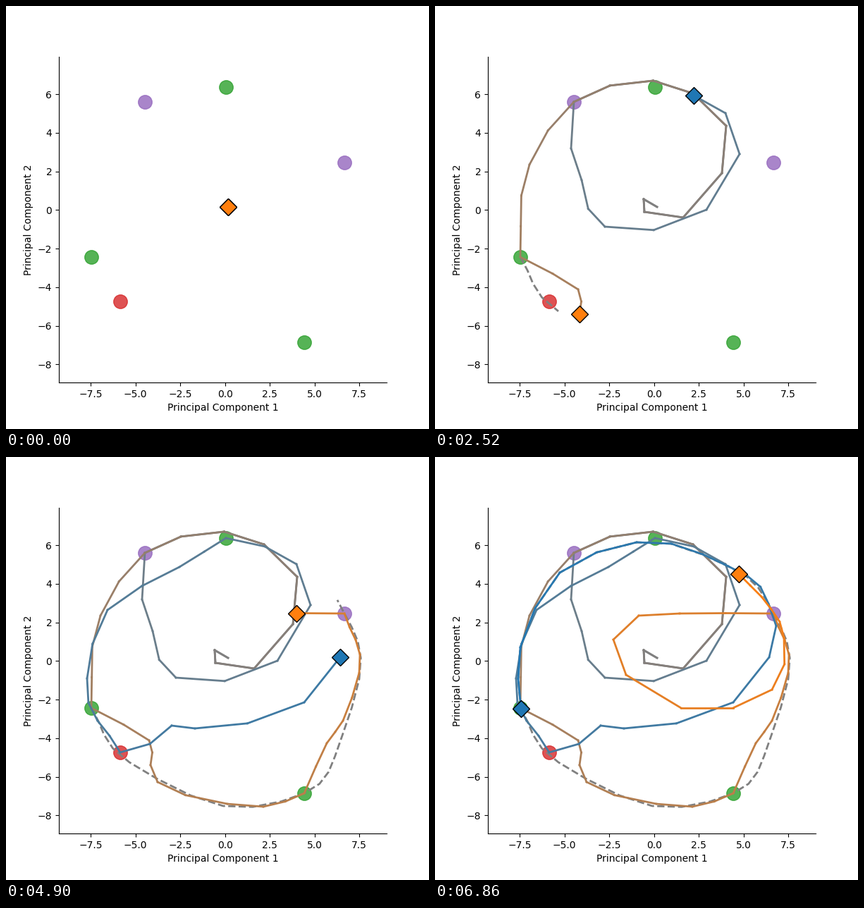
Animation of 600x600 px, one loop 8420 ms. Source, as a matplotlib script:

```python
import matplotlib.pyplot as plt
import numpy as np
from matplotlib.animation import FuncAnimation
from matplotlib.collections import LineCollection
from matplotlib.colors import to_rgb

TICK = 20            # ms per animation frame
STEP = 140           # ms per move along the paths
LOOP = 8420          # ms, includes the hold at the end
LAST = 49            # final step
SPLIT = 14           # step at which the undisturbed path branches off

# Target spots in stage pixels; each one kicks a path off its course.
TOP, LEFT, BOTTOM = (312, 115), (121, 356), (423, 477)
UPPER_LEFT, UPPER_RIGHT = (197, 136), (480, 222)
LOWER_LEFT = (162, 419)
SPOTS = {"tab:green": [TOP, LEFT, BOTTOM],
         "tab:purple": [UPPER_LEFT, UPPER_RIGHT],
         "tab:red": [LOWER_LEFT]}


def glide(keys):
    """Smooth curve through {step: point}, sampled at every whole step."""
    at = np.array(list(keys))
    points = np.array(list(keys.values()), float)
    slopes = np.gradient(points, at, axis=0)
    t = np.arange(at[0], at[-1] + 1)
    i = np.clip(np.searchsorted(at, t, "right") - 1, 0, len(at) - 2)
    span = (at[i + 1] - at[i])[:, None]
    u = (t - at[i])[:, None] / span
    ease = u * u * (3 - 2 * u)
    return (points[i] * (1 - ease) + points[i + 1] * ease
            + span * u * (1 - u) * ((1 - u) * slopes[i] - u * slopes[i + 1]))


def join(*legs):
    """Chain legs whose end and start points coincide."""
    return np.concatenate([legs[0]] + [leg[1:] for leg in legs[1:]])


def home(start):
    """Keys of the common way over the top to the left spot."""
    return {start: (416, 155), start + 3: (286, 121), start + 5: (177, 164),
            start + 7: (121, 270), start + 9: (122, 357)}


intro = glide({0: (315, 285), 1: (296, 274), 2: (297, 292), 3: (352, 300),
               4: (407, 237), 5: (413, 170), 6: (366, 124), 9: UPPER_LEFT,
               11: (134, 225), 14: LEFT})

orange_path = join(
    intro,
    glide({14: LEFT, 16: (203, 402), 18: (205, 437), 19: (215, 461),
           22: (365, 496), 24: BOTTOM}),
    glide({24: BOTTOM, 26: (455, 406), 28: (478, 374), 30: (501, 306),
           34: UPPER_RIGHT}),
    glide({34: UPPER_RIGHT, 36: (347, 222), 37: (289, 225), 38: (253, 259),
           39: (271, 309), 40: (349, 356), 42: (478, 330), 44: (495, 256),
           46: (477, 216), 49: (431, 166)}))

blue_path = join(
    intro[:10],
    glide({9: UPPER_LEFT, 10: (193, 202), 11: (208, 247), 13: (241, 313),
           15: (385, 289), 16: (432, 210), 17: (412, 152), 19: TOP}),
    glide({19: TOP, 21: (246, 156), 23: (144, 217), 25: (115, 314),
           29: LOWER_LEFT}),
    glide({29: LOWER_LEFT, 30: (204, 407), 31: (235, 381), 32: (268, 385),
           34: (423, 348), 35: (474, 284), 37: (473, 208), **home(40)}))

ghost_path = glide({SPLIT: LEFT, 18: (175, 433), 21: (308, 495), 24: BOTTOM,
                    28: (477, 395), 30: (501, 315), 34: UPPER_RIGHT,
                    **home(38)})


def fade(color, share):
    """Blend from mid grey towards a colour."""
    return 0.5 + (np.array(to_rgb(color)) - 0.5) * share


runners = {"tab:blue": blue_path, "tab:orange": orange_path}
segments, colors = [], []
for k in range(LAST):
    for color, path in runners.items():
        segments.append(path[k:k + 2])
        colors.append(fade(color, k / LAST))

fig, ax = plt.subplots(figsize=(6, 6), dpi=100)
ax.set(xlim=(-9.282, 9.032), ylim=(-8.937, 7.943),
       xlabel="Principal Component 1", ylabel="Principal Component 2")
ax.spines[["top", "right"]].set_visible(False)

# Overlay measured in stage pixels, y pointing down.
stage = fig.add_axes([0, 0, 1, 1])
stage.set(xlim=(0, 600), ylim=(600, 0))
stage.axis("off")

for color, spots in SPOTS.items():
    stage.plot(*zip(*spots), "o", ms=14, color=color, alpha=0.8, zorder=1)

ghost, = stage.plot([], [], "--", color="gray", lw=2, zorder=2)
trails = LineCollection([], colors=colors, linewidths=2,
                        capstyle="projecting", zorder=3)
stage.add_collection(trails, autolim=False)
diamonds = [stage.plot([], [], "D", ms=12, mfc=color, mec="black", zorder=4)[0]
            for color in runners]


def update(frame):
    step = min(frame * TICK // STEP, LAST)
    trails.set_segments(segments[:2 * step])
    ghost.set_data(*ghost_path[:max(0, step - SPLIT + 1)].T)
    for diamond, path in zip(diamonds, runners.values()):
        diamond.set_data(*path[step:step + 1].T)
    return ghost, trails, *diamonds


anim = FuncAnimation(fig, update, frames=LOOP // TICK, interval=TICK,
                     init_func=lambda: update(0), repeat=True, repeat_delay=0)
plt.show()
```
